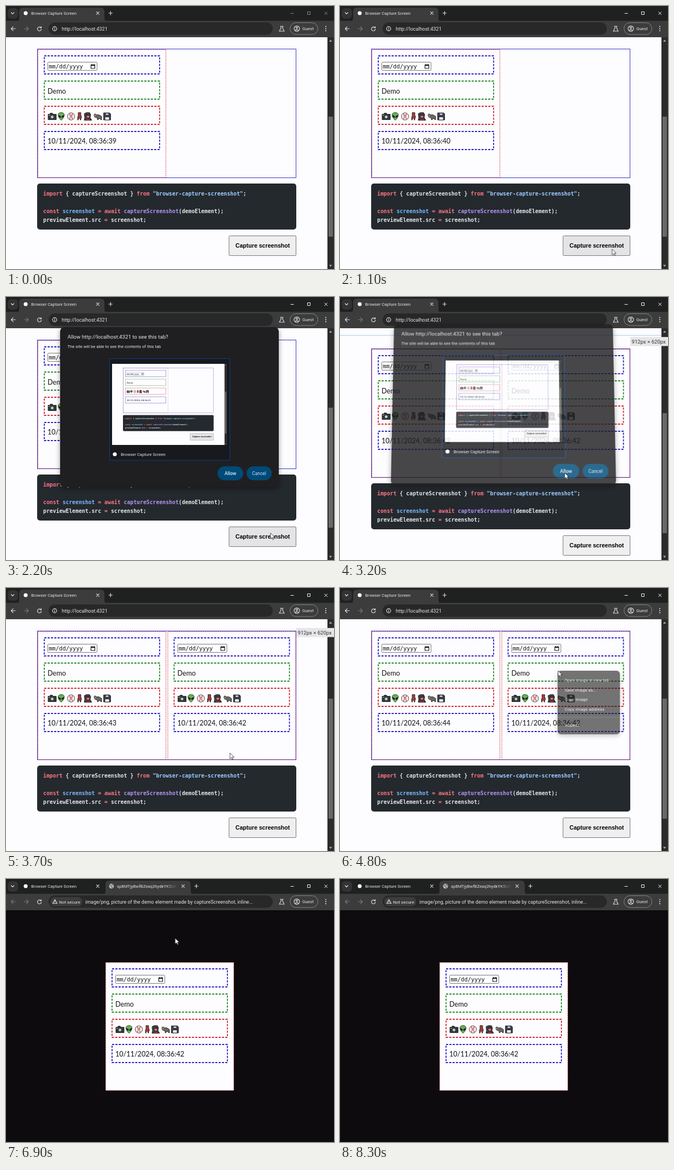
Write an HTML page that moves like this. It is 600 px wide and 480 px high and loops after 8.8 s.

```html
<!DOCTYPE html>
<html lang="en">
<head>
<meta charset="utf-8">
<title>Browser Capture Screen</title>
<style>
  html, body { margin: 0; width: 100%; height: 100%; overflow: hidden; background: #1f2020; }
  #stage { position: relative; width: 600px; height: 480px; overflow: hidden; }
  svg { display: block; }
  #stage > svg, #dialog { position: absolute; left: 0; top: 0; }
  text { font-family: Roboto, "Open Sans", sans-serif; white-space: pre; }
  .line { fill: none; stroke: #dcdcdc; stroke-width: 1.2; stroke-linecap: round; stroke-linejoin: round; }
  .body { font: 12.6px Lato, "Open Sans", sans-serif; fill: #111; }
  .mono { font: 10.4px "DejaVu Sans Mono", monospace; fill: #111; }
  .code { font: bold 9.8px "DejaVu Sans Mono", monospace; fill: #e1e4e8; }
  .key { fill: #f97583; } .str { fill: #9ecbff; } .var { fill: #79b8ff; } .fn { fill: #b392f0; }
  .label { font: bold 10.6px "Liberation Sans", Arial, sans-serif; fill: #000; }

  #stage > #view { top: 57px; }
  #stage > #dialog { left: 99px; top: 55px; border-radius: 8px; overflow: hidden;
    transform-origin: 50% 0; box-shadow: 0 3px 10px #0006; animation: dialog 8.8s linear infinite; }
  #cursor { animation: cursor 8.8s linear infinite; }
  #menu { animation: menu 8.8s linear infinite; filter: drop-shadow(0 3px 4px #0005); }
  .spin { transform-origin: 300px 194px; animation: spin 1s linear infinite; }
  .step { animation: 8.8s step-end infinite; }
  .focus { animation-name: focus; }
  .hover { animation-name: hover; }
  .loading { animation-name: loading; }
  .loaded { animation-name: loaded; }
  .captured { animation-name: captured; }
  .tip { animation-name: tip; }
  .bar { animation-name: bar; }
  .tab2 { animation-name: tab2; }
  .plus { animation-name: plus; }
  .active { animation-name: active; }
  .first { animation-name: first; }
  .second { animation-name: second; }
  #view .shift { animation: shift 8.8s linear infinite; }
  #view .thumb { animation: thumb 8.8s linear infinite; }

  @keyframes cursor {
    0%, 3% { transform: translate(552px, 482px); }
    10.5% { transform: translate(498px, 444px); }
    15.9%, 22.7% { transform: translate(497px, 443px); }
    25% { transform: translate(484px, 431px); }
    30.7%, 41% { transform: translate(411px, 321px); }
    50%, 54.6% { transform: translate(399px, 151px); }
    59%, 64.8% { transform: translate(448px, 165px); }
    72.8% { transform: translate(403px, 128px); }
    73.8%, 76% { transform: translate(270px, 16px); }
    84% { transform: translate(400px, 320px); }
    93% { transform: translate(405px, 452px); opacity: 1; }
    93.1%, 100% { transform: translate(405px, 452px); opacity: 0; }
  }
  @keyframes dialog {
    0%, 14.5% { opacity: 0; transform: perspective(2100px) translateY(-13px) rotateX(25deg); }
    15.91% { opacity: .25; transform: perspective(2100px) translateY(-10px) rotateX(20deg); }
    18.5%, 35% { opacity: 1; transform: perspective(2100px) translateY(0) rotateX(0); }
    36.36% { opacity: .83; transform: perspective(2100px) translateY(-5px) rotateX(12deg); }
    38.5%, 100% { opacity: 0; transform: perspective(2100px) translateY(-13px) rotateX(25deg); }
  }
  @keyframes menu {
    0%, 53.4% { opacity: 0; }
    54.55% { opacity: .62; }
    56%, 60.2% { opacity: 1; }
    61.2%, 100% { opacity: 0; }
  }
  @keyframes shift {
    0%, 35.8% { transform: translateY(0); }
    36.2%, 39.5% { transform: translateY(16px); }
    40.5%, 100% { transform: translateY(0); }
  }
  @keyframes thumb {
    0%, 35.8% { transform: translateY(0); }
    36.2%, 39.5% { transform: translateY(10px); }
    40.5%, 100% { transform: translateY(0); }
  }
  @keyframes spin { to { transform: rotate(360deg); } }
  @keyframes focus { 0% { stroke: #858585; } 10.8%, 100% { stroke: #f4f4f4; } }
  @keyframes hover { 0% { fill: #efefef; } 9% { fill: #e4e4e6; } 26%, 100% { fill: #efefef; } }
  @keyframes loading { 0% { visibility: visible; } 19.3%, 100% { visibility: hidden; } }
  @keyframes loaded { 0% { visibility: hidden; } 19.3%, 100% { visibility: visible; } }
  @keyframes captured { 0% { visibility: hidden; } 35.8%, 100% { visibility: visible; } }
  @keyframes tip { 0% { visibility: hidden; } 35.8% { visibility: visible; } 44%, 100% { visibility: hidden; } }
  @keyframes bar { 0% { visibility: hidden; } 35.8% { visibility: visible; } 39.7%, 100% { visibility: hidden; } }
  @keyframes tab2 { 0% { visibility: hidden; } 65.4%, 100% { visibility: visible; } }
  @keyframes plus { 0% { transform: none; } 65.4%, 100% { transform: translateX(157px); } }
  @keyframes active { 0% { transform: none; } 73.3%, 100% { transform: translateX(158px); } }
  @keyframes first { 0% { visibility: visible; } 73.3%, 100% { visibility: hidden; } }
  @keyframes second { 0% { visibility: hidden; } 73.3%, 100% { visibility: visible; } }
</style>
</head>
<body>
<div id="stage">
  <svg id="chrome" width="600" height="480"></svg>
  <svg id="view" width="600" height="423" viewBox="0 57 600 423"></svg>
  <svg id="viewer" class="step second" width="600" height="480"></svg>
  <svg id="popup" width="600" height="480"></svg>
  <div id="dialog"></div>
  <svg id="pointer" width="600" height="480">
    <path id="cursor" d="M0 0V10.5L2.5 8.3L4.2 12L6 11.2L4.3 7.6H7.6Z" fill="#fff" stroke="#222" stroke-width=".8"/>
  </svg>
</div>
<script>
const LOOP = 8800;
const put = (id, html) => { document.getElementById(id).innerHTML = html; };
const text = (x, y, size, str, fill = "#e6e6e6", more = "") =>
  `<text x="${x}" y="${y}" font-size="${size}" fill="${fill}" ${more}>${str}</text>`;
const rect = (x, y, w, h, fill, more = "") =>
  `<rect x="${x}" y="${y}" width="${w}" height="${h}" fill="${fill}" ${more}/>`;
const line = (d, more = "") => `<path class="line" d="${d}" ${more}/>`;
const cross = (x, y, r) => `M${x - r} ${y - r}l${2 * r} ${2 * r}m0 ${-2 * r}l${-2 * r} ${2 * r}`;
const mark = (x, y) => `<circle cx="${x}" cy="${y}" r="3.6" fill="#fff"/>`;

const emoji = `<g stroke="#1a1a1a" stroke-width=".8">
  <path d="M1 4H4L5 2H9L10 4H16V14H1Z" fill="#34383a"/><circle cx="8.5" cy="9" r="3" fill="#b9d3cf"/>
  <path d="M2 6h3" stroke="#d8d8a0"/>
  <path d="M25 1C33 1 32 9 25 15C18 9 17 1 25 1Z" fill="#62b552"/>
  <path d="M20.5 6l3.5 2v2l-3-1zM29.5 6l-3.5 2v2l3-1z" fill="#111"/>
  <circle cx="43" cy="8" r="6.6" fill="#f3eeee"/>
  <path d="M40 3q4 5 0 10M46 3q-4 5 0 10" fill="none" stroke="#c83a3a" stroke-width="1.3"/>
  <path d="M56 1h5v6h1v4h-1v3.5h-1.5v-3h-3v3h-1.5v-6h1z" fill="#a8393a"/>
  <path d="M67 15L68 10L67 3L71 1H77L79 5L78 10L81 15Z" fill="#384650"/>
  <path d="M71 4h6v5l-3 2-3-2z" fill="#e2a58b"/><path d="M70 5h8v2h-8z" fill="#c3343b"/>
  <path d="M69 15l3-4 2 2 3-2 2 4z" fill="#bd3340"/>
  <path d="M85 5l2-2 2 2 5 0 5 3v6h-2v-2h-4v2h-2v-3l-5-2z" fill="#6d6862"/>
  <path d="M86 7h2" stroke="#eee"/>
  <path d="M102.5 1.5h11l2 2v11h-13z" fill="#3b4050"/>
  <path d="M105 9h8v5.5h-8z" fill="#eee"/><path d="M106 2h6v4h-6z" fill="#bfc6cf"/></g>`;

// The captured element, with its corner at (x, y)
function demo(x, y, clock) {
  const boxes = ["#2a22c4", "#2c8a2c", "#d22a32", "#2a22c4"].map((c, i) =>
    rect(12, 12 + 46 * i, 211, 33, "none", `stroke="${c}" stroke-width="1.8" stroke-dasharray="3.9 2.2"`)).join("");
  return `<g transform="translate(${x} ${y})">
    ${rect(.5, .5, 234, 233.5, "none", 'stroke="#d0303c" stroke-width=".9" stroke-dasharray="2 1.4"')}
    ${boxes}
    ${rect(18.5, 23.5, 90, 15, "#fff", 'stroke="#777" rx="1"')}
    <text class="mono" x="20.3" y="34.6">mm/dd/yyyy</text>
    <path d="M97.5 28.5h7v6.5h-7zM97.5 29.5h7M99 27v1.5M103 27v1.5" fill="none" stroke="#111" stroke-width="1.2"/>
    <text class="body" x="18" y="80.5">Demo</text>
    <g transform="translate(18 114.5)">${emoji}</g>
    <text class="body" x="18" y="172.3">10/11/2024, 08:36:${clock}</text>
  </g>`;
}

function page(shot) {
  const live = '<tspan class="clock">39</tspan>';
  const span = (cls, str) => `<tspan class="${cls}">${str}</tspan>`;
  const code = [
    `${span("key", "import")} { captureScreenshot } ${span("key", "from")} ${span("str", '"browser-capture-screenshot"')};`,
    "",
    `${span("key", "const")} ${span("var", "screenshot")} ${span("key", "=")} ${span("key", "await")} ${span("fn", "captureScreenshot")}(demoElement);`,
    `previewElement.src ${span("key", "=")} screenshot;`
  ].map((s, i) => `<text class="code" x="68" y="${346.3 + 15.9 * i}">${s}</text>`).join("");
  return rect(0, 57, 600, 423, "#fdfdff") + `<g class="shift">
    ${rect(57.5, 78.5, 473, 235, "none", 'stroke="#3a36c4"')}
    ${demo(58, 79, live)}
    ${shot ? `<g class="step captured">${demo(295.5, 79, 42)}</g>` : ""}
    ${rect(57, 324, 474, 84, "#24292e", 'rx="5"')}${code}
    ${rect(408, 419.5, 122.5, 36, "#efefef", 'class="step hover" stroke="#777" rx="1.5"')}
    <text class="label" x="469.5" y="440.5" text-anchor="middle">Capture screenshot</text></g>
    ${rect(588, 57, 12, 423, "#2c2c2c")}
    ${rect(590, 202, 8, 219, "#696969", 'class="thumb"')}
    <path d="M591 65h5.5l-2.75-3.5zM591 472.5h5.5l-2.75 3.5z" fill="#aaa"/>`;
}

const back = "M17 41.5H9.5M13 38l-3.5 3.5L13 45";
put("chrome", `
  <defs><linearGradient id="fade" x1="200" x2="314" gradientUnits="userSpaceOnUse">
    <stop offset=".8" stop-color="#e6e6e6"/><stop offset="1" stop-color="#e6e6e6" stop-opacity="0"/></linearGradient>
    <clipPath id="cut"><path d="M202 4h111v20h-111z"/></clipPath></defs>
  ${rect(0, 0, 600, 57, "#1f2020")}
  ${rect(3, 4, 19, 19, "#333", 'rx="6"')}${line("M9.5 12l2.5 2.5 2.5-2.5")}
  <path class="step active" d="M19 28Q24 28 24 22V10Q24 3 31 3H173Q180 3 180 10V22Q180 28 185 28Z" fill="#3c3c3c"/>
  ${mark(36, 13)}${text(46, 16, 7.75, "Browser Capture Screen")}${line(cross(168, 13, 2.3))}
  <g class="step tab2">
    <circle cx="193" cy="13" r="4.5" fill="#b8b8b8"/>
    <path d="M189.5 11q3 0 3 2t2 2v2M194 9q-1 2 3 3" fill="none" stroke="#444"/>
    ${text(203, 16, 7.75, "sp8MTjyBwfBZeaq2hydkYK5UIfF", "url(#fade)", 'clip-path="url(#cut)"')}
    ${line(cross(324, 13, 2.3))}
  </g>
  <g class="step plus">${line("M188 13h6.5M191.25 9.75v6.5")}</g>
  <path class="step focus" fill="none" stroke="#f4f4f4" d="M520.5 13.5h6M551.5 10.5h5v5h-5zM582.5 10.5l5.5 5.5m0-5.5l-5.5 5.5"/>
  ${rect(0, 27, 600, 30, "#3c3c3c")}
  <g class="step first">${line(back)}</g>
  <g class="step second">${line(back, 'style="stroke:#777"')}</g>
  ${line("M33.5 41.5H41M37.5 38l3.5 3.5L37.5 45", 'style="stroke:#777"')}
  ${line("M64 39.5A3.6 3.6 0 1 0 64.7 42.5M64.5 37.5v2.5h-2.5")}
  ${rect(78, 30, 410, 22.5, "#282828", 'rx="11.25"')}
  <g class="step first"><circle class="line" cx="89" cy="41.5" r="3.8"/>${line("M89 41v2.3M89 39.4v.1")}
    ${text(102, 44.7, 9, "http://localhost:4321")}</g>
  <g class="step second">${rect(81, 33, 58.5, 16.5, "#3c3c3c", 'rx="8"')}
    ${line("M89.5 37.5l4 7h-8zM89.5 40.5v1.5")}${text(97, 44.5, 8, "Not secure")}
    ${text(145, 44.7, 9, "image/png, picture of the demo element made by captureScreenshot, inline...")}</g>
  ${line("M502 37h5M503 37v3.5l-3 5.5h9l-3-5.5v-3.5")}
  ${rect(519.5, 30.5, 51, 21.5, "none", 'rx="10.75" stroke="#858585"')}
  <circle class="line" cx="532" cy="41.3" r="5"/><circle class="line" cx="532" cy="39.8" r="1.5"/>${line("M529 44.7q3-2.5 6 0")}
  ${text(542, 44.3, 8, "Guest")}
  ${[37.5, 41.3, 45.1].map(y => `<circle cx="585" cy="${y}" r="1.1" fill="#ddd"/>`).join("")}`);

put("view", page(true) + `
  <g class="step bar">${rect(0, 57, 588, 12, "#fdfdff")}${rect(0, 69, 588, 2, "#cfe2f8")}</g>
  <g class="step tip">${rect(531, 73, 69, 16.5, "#e6e6e8")}${text(533.5, 84.7, 9.6, "912px × 620px", "#333")}</g>`);

put("viewer", rect(0, 57, 600, 423, "#0d0b0e") + rect(182, 152, 235, 234, "#fdfdff") + demo(182, 152, 42));

const items = [["Open image in new tab", 170.8], ["Save image as...", 188.6], ["Copy image", 206.4],
  ["Copy image address", 224.2], ["Inspect", 253.3]];
put("popup", `<g id="menu">
  ${rect(398, 151, 114, 116, "#1f1f1f", 'rx="6"')}${rect(398, 235.5, 114, 1, "#444")}
  ${items.map(([s, y]) => text(411, y, 8, s)).join("")}</g>`);

put("dialog", `<svg width="400" height="292" viewBox="99 55 400 292">
  ${rect(99, 55, 400, 292, "#1f1f21")}
  ${text(112.5, 76, 9.7, "Allow http://localhost:4321 to see this tab?")}
  ${text(112.5, 93, 7.7, "The site will be able to see the contents of this tab")}
  <g class="step loading"><path class="line spin" style="stroke-width:2" d="M300 186a8 8 0 1 1-7 4"/></g>
  <g class="step loaded">
    ${rect(189.5, 112.5, 220, 185.5, "#17191d", 'stroke="#0c3f8a"')}
    <svg x="194" y="122" width="210" height="148" viewBox="0 57 600 423">${page(false)}</svg>
    ${rect(387, 309, 47, 25.5, "#004a77", 'rx="12.75"')}
    ${text(410.5, 325, 8.6, "Allow", "#d6eeff", 'text-anchor="middle" font-weight="500"')}
  </g>
  ${mark(199, 287)}${text(210, 290, 7.65, "Browser Capture Screen")}
  ${rect(440, 309, 46, 25.5, "#004a77", 'rx="12.75"')}
  ${text(463, 325, 8.4, "Cancel", "#c2e7ff", 'text-anchor="middle"')}</svg>`);

const clocks = document.querySelectorAll(".clock");
let start;
function tick(now) {
  start ??= now;
  const sec = 39 + Math.floor(((now - start) % LOOP + 400) / 1000);
  clocks.forEach(c => { if (c.textContent != sec) c.textContent = sec; });
  requestAnimationFrame(tick);
}
requestAnimationFrame(tick);
</script>
</body>
</html>
```
